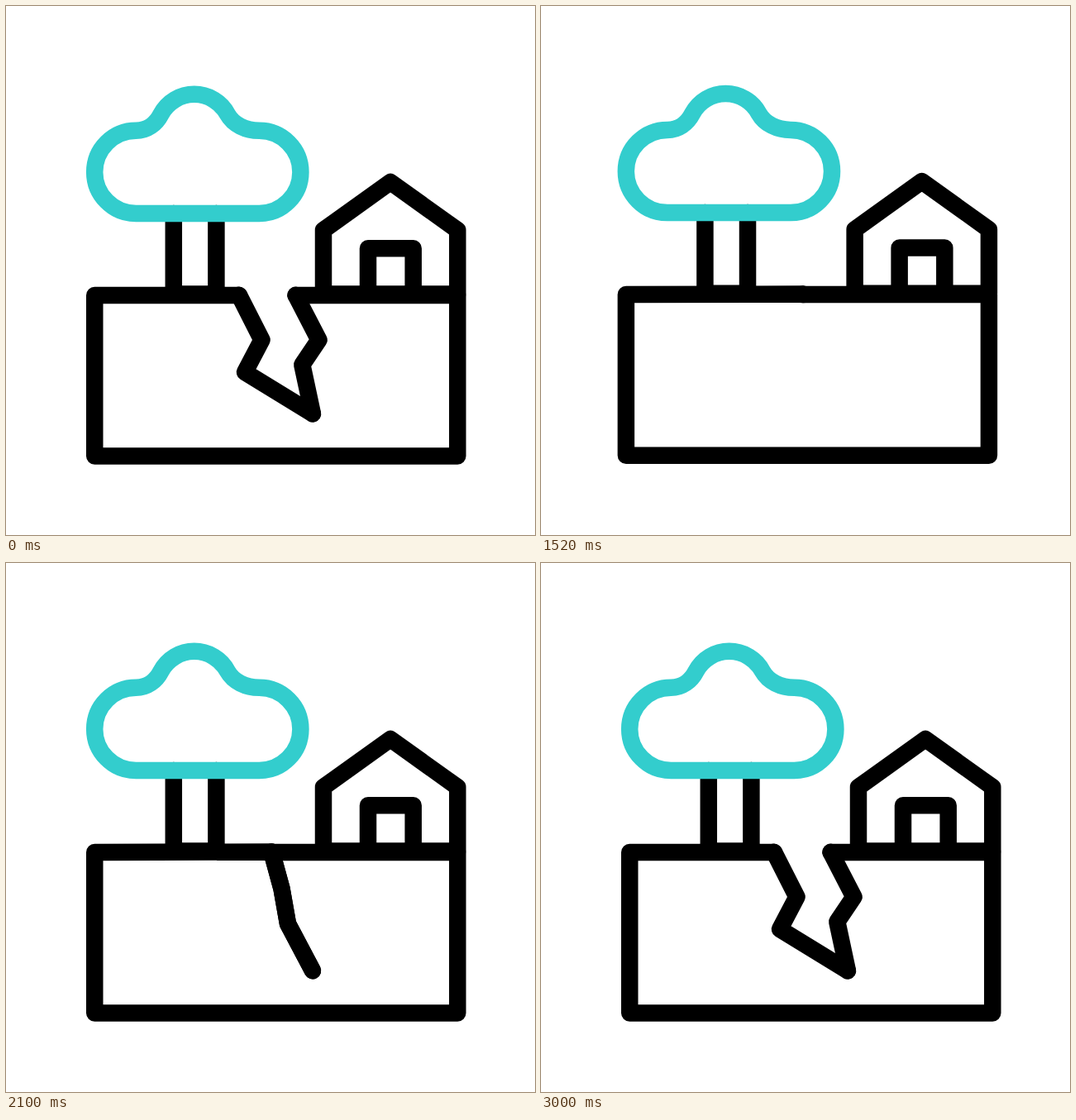
Animation of 640 by 640 pixels, one loop 3.22 s. Source, as an HTML page:

```html
<!DOCTYPE html>
<html lang="en">
<head>
<meta charset="utf-8">
<title>Earthquake</title>
<style>
  html, body { margin: 0; width: 100%; height: 100%; overflow: hidden; background: #fff; }
  svg { display: block; width: 100%; height: 100%; }
  path { fill: none; stroke: #000; stroke-width: 20.5; stroke-linecap: round; stroke-linejoin: round; }
  #cloud { stroke: #33cdcd; }
</style>
</head>
<body>
<svg viewBox="0 0 640 640">
  <g id="scene">
    <path d="M202.8 251V348.6H254.4V251"/>
    <path id="cloud" d="M157.3 251A50 50 0 0 1 157.3 150.8C170.5 150.8 181.5 142.8 187.5 131A45.6 45.6 0 0 1 268 131C275 143.5 290 150.8 306.3 150.8A50 50 0 0 1 306.3 251Z"/>
    <path d="M384 348.6V271.2L465.1 213L546.3 271.2V348.6Z"/>
    <path d="M438 348.6V293.3H492.7V348.6"/>
    <path id="ground"/>
    <path id="left" pathLength="1"/>
    <path id="right" pathLength="1"/>
  </g>
</svg>
<script>
  const LOOP = 3220, STEP = 20;
  const $ = id => document.getElementById(id);
  const scene = $('scene'), ground = $('ground');

  // Crack edges from the surface down to the shared tip
  const TIP = [371, 493.3];
  const OPEN = {
    left: [[282, 349.9], [309.5, 404], [289, 443]],
    right: [[350.5, 349.9], [378.5, 404], [358.3, 434]]
  };
  const SHUT = {
    left: [[321.4, 349.5], [333.5, 394], [341, 436.5]],
    right: [[321.4, 349.9], [333.5, 394], [341, 436.5]]
  };

  // Shake corners, 60 ms apart
  const O = [0, 0], A = [-13.1, 0], C = [-13.1, 12.7], D = [0, 12.7];
  const SHAKE = [O, A, D, C, A, D, C, D, C, A, O];
  const BEAT = 60;

  const ramp = (t, a, b) => Math.min(1, Math.max(0, (t - a) / (b - a)));
  const mix = (a, b, k) => a + (b - a) * k;
  const mixPoint = (p, q, k) => [mix(p[0], q[0], k), mix(p[1], q[1], k)];
  const line = points => 'M' + points.map(p => p.join(' ')).join('L');

  function shakeAt(t) {
    const i = Math.floor(t / BEAT);
    if (t < 0 || i >= SHAKE.length - 1) return O;
    const u = t / BEAT - i, p = SHAKE[i], q = SHAKE[i + 1];
    const arc = 4 * u * (1 - u);
    let [x, y] = mixPoint(p, q, u);
    // straight sides bow outwards
    if (p[1] === q[1]) y += arc * (p[1] ? 1.7 : -1);
    else if (p[0] === q[0]) x -= arc * 1.65;
    return [x, y];
  }

  function draw(t) {
    const opening = ramp(t, 2580, 3000);
    const top = 1 - ramp(t, 200, 740) + opening;
    const deep = 1 - ramp(t, 200, 600) + opening;
    const length = 1 - ramp(t, 620, 900) + ramp(t, 1720, 2100);

    const edge = {};
    for (const side of ['left', 'right']) {
      edge[side] = SHUT[side].map((p, i) => mixPoint(p, OPEN[side][i], i ? deep : top));
      $(side).setAttribute('d', line([...edge[side], TIP]));
      $(side).setAttribute('stroke-dasharray', length < 1 ? `${length} 2` : 'none');
    }
    ground.setAttribute('d', line([
      edge.left[0], [107.25, 349.9], [107.25, 544.6],
      [546.3, 544.6], [546.3, 349.9], edge.right[0]
    ]));

    const [x, y] = shakeAt(t < 2400 ? t - 1500 : t - 2400);
    scene.setAttribute('transform', `translate(${x} ${y})`);
  }

  const start = performance.now();
  function tick() {
    const t = (performance.now() - start) % LOOP;
    draw(Math.floor(t / STEP) * STEP);
    requestAnimationFrame(tick);
  }
  tick();
</script>
</body>
</html>
```
